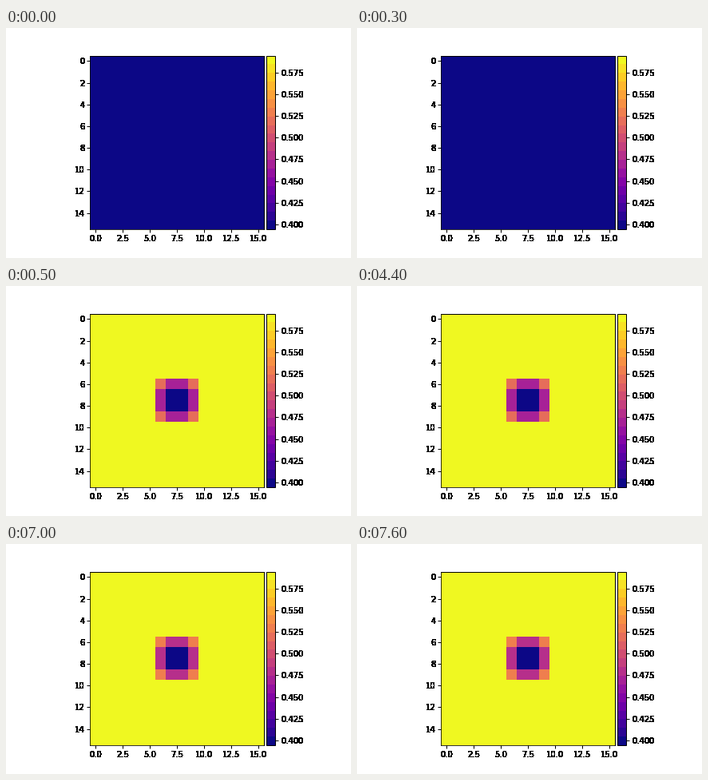
Animation of 432 by 288 pixels, one loop 8 s. Source, as a matplotlib script:

```python
import numpy as np
import matplotlib.pyplot as plt
from matplotlib.animation import FuncAnimation
from mpl_toolkits.axes_grid1 import make_axes_locatable

plt.rcParams.update({
    "font.family": "DejaVu Sans",
    "font.size": 10,
    "figure.subplot.bottom": 0.125,
})

SIZE, LEVELS = 16, 20
LOW, HIGH = 0.3945, 0.5945
STEP_MS, FRAMES = 500, 16
REST, SETTLE = 1, 14  # steps at which the field jumps


def level(k):
    """Value in the middle of colour band k."""
    return LOW + (k + 0.5) * (HIGH - LOW) / LEVELS


def field(step):
    if step < REST:
        return np.full((SIZE, SIZE), level(0))
    shift = int(step >= SETTLE)
    grid = np.full((SIZE, SIZE), level(LEVELS - 1))
    grid[6:10, 6:10] = level(12 + shift)
    grid[6:10, 7:9] = grid[7:9, 6:10] = level(7 + shift)
    grid[7:9, 7:9] = level(0)
    return grid


def harden(img, dpi):
    """Turn every touched pixel solid black, for heavy aliased text."""
    out = np.zeros_like(img)
    out[..., 3] = img[..., 3] > 0.01
    return out, 0, 0


def style(axes):
    axes.tick_params(length=4, pad=3, width=1)
    for label in axes.get_xticklabels() + axes.get_yticklabels():
        label.set_agg_filter(harden)


fig, ax = plt.subplots(figsize=(6, 4), dpi=72)
image = ax.imshow(field(0), cmap=plt.get_cmap("plasma", LEVELS),
                  vmin=LOW, vmax=HIGH, interpolation="nearest")
cax = make_axes_locatable(ax).append_axes("right", size="5%", pad=0.05)
bar = fig.colorbar(image, cax=cax)
bar.outline.set_linewidth(1)
for side in ("top", "right"):
    ax.spines[side].set_linewidth(1)

fig.canvas.draw()
style(ax)
style(cax)


def update(step):
    image.set_data(field(step))
    return [image]


anim = FuncAnimation(fig, update, frames=FRAMES, interval=STEP_MS,
                     repeat=True, repeat_delay=0, blit=False)
plt.show()
```
